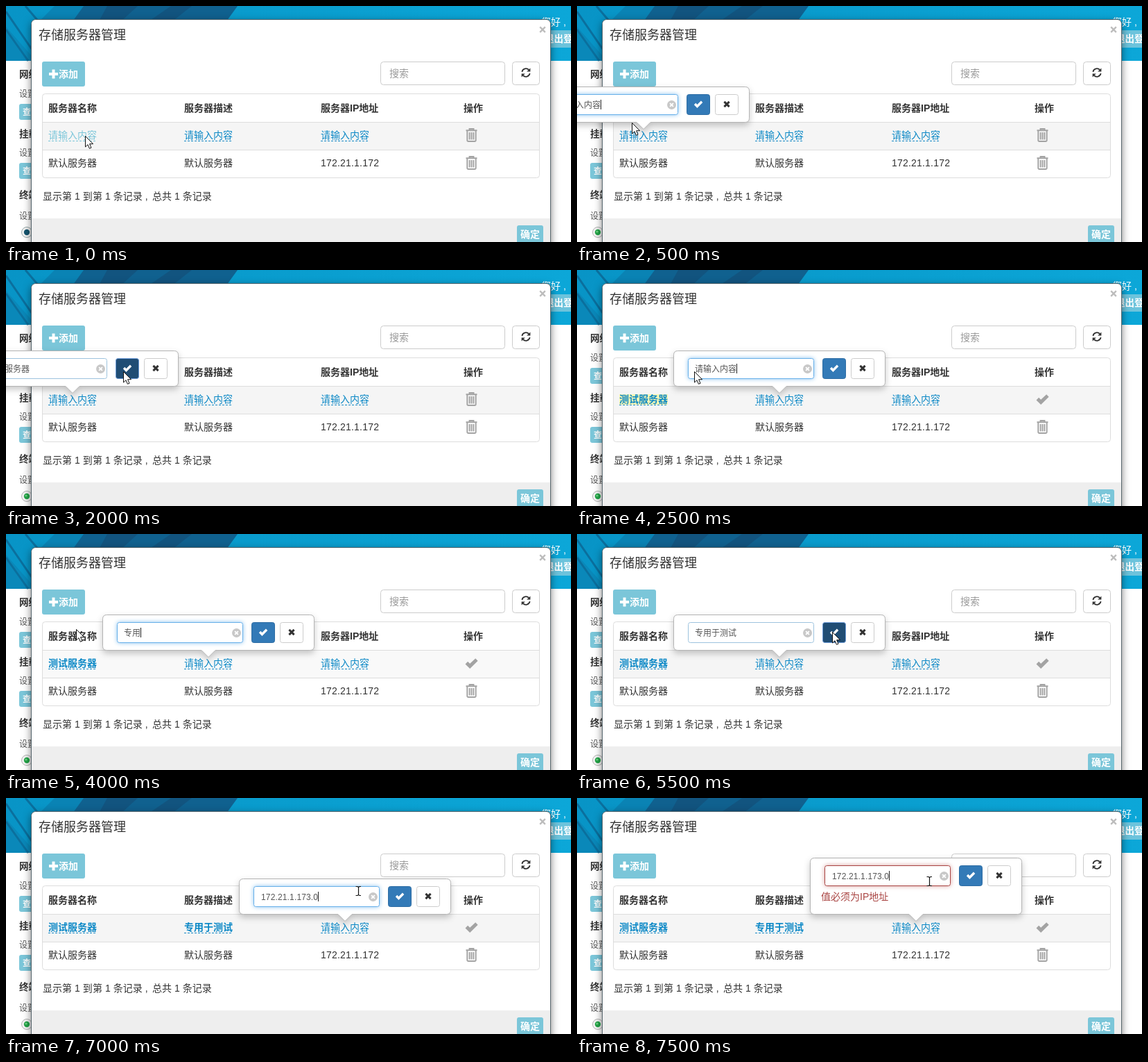
An HTML page for the animation above (8000 ms loop, 815 by 340 pixels).

```html
<!DOCTYPE html>
<html lang="zh-CN">
<head>
<meta charset="utf-8">
<title>存储服务器管理</title>
<style>
html, body { margin: 0; width: 100%; height: 100%; overflow: hidden; background: #fff; }
svg { display: block; width: 815px; height: 340px; }
text { font-family: "Liberation Sans", "Noto Sans CJK SC", "Noto Sans CJK", sans-serif; white-space: pre; }
.modal { filter: drop-shadow(0 4px 6px rgba(0,0,0,.5)); }
.pop { filter: drop-shadow(0 4px 5px rgba(0,0,0,.22)); }
.focus { filter: drop-shadow(0 0 3px rgba(102,175,233,.75)); }
.wrong { filter: drop-shadow(0 0 3px rgba(206,132,131,.8)); }
</style>
</head>
<body>
<svg id="stage" viewBox="0 0 815 340" xmlns="http://www.w3.org/2000/svg"></svg>
<script>
const STEP = 500;
const TEAL = '#7bc6d9', LINK = '#0b88c6', INK = '#333';
const COLS = [61, 257, 454];
const SAVED = ['测试服务器', '专用于测试'];
const EMPTY = '请输入内容';
const IP = '172.21.1.173.0';

// One entry per half second; pop = open editor column, arrow / beam = pointer position
const steps = [
  { arrow: [114, 187], hover: 1, hot: 1 },
  { pop: 0, text: EMPTY, caret: 1, arrow: [79, 168], hot: 1 },
  { pop: 0, text: '测试', caret: 1, hot: 1 },
  { pop: 0, text: SAVED[0], caret: 1, hot: 1 },
  { pop: 0, text: SAVED[0], press: 1, arrow: [169, 146], hot: 1 },
  { pop: 1, text: EMPTY, caret: 1, saved: 1, mark: 0, arrow: [169, 146], hot: 1 },
  { pop: 1, text: EMPTY, caret: 1, saved: 1, arrow: [112, 130] },
  { pop: 1, text: '', caret: 1, saved: 1, arrow: [112, 130] },
  { pop: 1, text: '专用', caret: 1, saved: 1, arrow: [101, 137] },
  { pop: 1, text: '专用于', caret: 1, saved: 1 },
  { pop: 1, text: SAVED[1], caret: 1, saved: 1 },
  { pop: 1, text: SAVED[1], press: 1, saved: 1, arrow: [368, 141], hot: 1 },
  { pop: 2, text: EMPTY, caret: 1, saved: 2, mark: 1, arrow: [406, 179], hot: 1 },
  { pop: 2, text: IP.slice(0, 8), caret: 1, saved: 2, arrow: [300, 132] },
  { pop: 2, text: IP, caret: 1, saved: 2, beam: [508, 134], hot: 1 },
  { pop: 2, text: IP, caret: 1, saved: 2, beam: [508, 120], hot: 1, error: 1 }
];

// Full-width comma with its mark near the middle of the cell
const comma = s => s.replace(/，(.*)/, '<tspan dx="4">,</tspan><tspan dx="6.1">$1</tspan>');
const text = (x, y, s, { size = 14, fill = INK, bold = 0, gap = 0 } = {}) =>
  `<text x="${x}" y="${y}" font-size="${size}" fill="${fill}" font-weight="${bold ? 700 : 400}" letter-spacing="${gap}">${comma(s)}</text>`;
const box = (x, y, w, h, fill, r = 0, stroke = 'none', extra = '') =>
  `<rect x="${x}" y="${y}" width="${w}" height="${h}" rx="${r}" fill="${fill}" stroke="${stroke}" ${extra}/>`;
const path = (d, fill, stroke = 'none', w = 1) =>
  `<path d="${d}" fill="${fill}" stroke="${stroke}" stroke-width="${w}"/>`;
const at = (x, y, s, scale = 1) => `<g transform="translate(${x} ${y}) scale(${scale})">${s}</g>`;

const tick = fill => path('M-6.2.3L-3.7-2.2-1.6-.1 3.9-5.4 6.3-3-1.6 4.9Z', fill);
const cross = (r, color, w) => path(`M${-r} ${-r}L${r} ${r}M${r} ${-r}L${-r} ${r}`, 'none', color, w);
const trash = y => at(671.5, y,
  path('M-3-7.5V-9H3V-7.5M-8-6.7H8M-6.2-6V7.2Q-6.2 9-4.5 9H4.5Q6.2 9 6.2 7.2V-6M-2.9-4V6.5M0-4V6.5M2.9-4V6.5', 'none', '#a3a3a3', 1.9));
const arrow = ([x, y]) => at(x, y,
  path('M.5.5V16L4 12.7 6.4 18.3 9 17.2 6.6 11.7H11.6Z', '#fff', '#111'));
const beam = ([x, y]) => at(x, y,
  path('M-3.5-6.5H-1L.5-5.5 2-6.5H4M.5-5.5V6M-3.5 6.5H-1L.5 5.5 2 6.5H4', 'none', '#111', 1.2));

function banner() {
  return box(0, 0, 815, 79, 'url(#sky)') +
    path('M0 30L37 72V79H0Z', '#0a88b9') +
    path('M0 8L37 62M0 34L32 79M28 0L62 40', 'none', '#0b6f9d', 3) +
    path('M70 0H112L96 22H48Z', '#0a83b4') +
    path('M112 0H334L318 22H96Z', '#10618f') +
    path('M146 0H190L166 22H134Z', '#12547f') +
    path('M238 0H268L240 22H206Z', '#12547f');
}

function sidebar() {
  const section = (y, title, gap) => text(19, y, title, { size: 13.5, bold: 1 }) +
    text(19, y + gap, '设置', { size: 12, fill: '#555' });
  const button = y => box(19, y, 40, 23, TEAL, 3) +
    text(24, y + 16, '查看', { size: 12, fill: '#fff', bold: 1 });
  return section(103, '网络', 28) + button(141) + section(189, '挂载', 27) + button(226) +
    section(277, '终端', 30);
}

function account() {
  return text(772, 28, '您好，', { fill: '#fff' }) +
    box(770, 35, 60, 25, '#6cc3dc', 3) +
    text(777, 52, '退出登录', { size: 13.5, fill: '#fff', bold: 1 });
}

function dialog() {
  const head = ['服务器名称', '服务器描述', '服务器IP地址', '操作'];
  const half = 'M-5.6-1.2A5.7 5.7 0 0 1 4.3-3.9';
  const tip = 'M6.4-6.6V-1.4H1.2Z';
  return `<g class="modal">${box(36.5, 19.5, 749, 340, '#fff', 6, '#56656c')}</g>` +
    box(37, 306, 748, 34, '#eee') +
    text(47, 48, '存储服务器管理', { size: 18 }) +
    at(774, 34, cross(3.8, '#bdbdbd', 2.4)) +
    box(52, 80, 62, 36, TEAL, 3) +
    path('M62 98H75M68.5 91.5V104.5', 'none', '#fff', 4) +
    text(76, 103, '添加', { fill: '#fff', bold: 1 }) +
    box(540.5, 80.5, 179, 33, '#fff', 4, '#ccc') +
    text(553, 102, '搜索', { fill: '#999' }) +
    box(730.5, 80.5, 39, 33, '#fff', 4, '#ccc') +
    at(750, 96, [0, 180].map(a => `<g transform="rotate(${a})">` +
      path(half, 'none', INK, 1.9) + path(tip, INK) + '</g>').join('')) +
    box(52.5, 126.5, 717, 121, '#fff', 4, '#ddd') +
    head.map((s, i) => text([...COLS, 660][i], 152, s, { bold: 1 })).join('') +
    path('M53 167.5H769M53 207.5H769', 'none', '#ddd') +
    text(61, 231, '默认服务器') + text(257, 231, '默认服务器') +
    text(454, 231, '172.21.1.172', { gap: .2 }) + trash(226) +
    text(53, 279, '显示第 1 到第 1 条记录，总共 1 条记录', { gap: .05 }) +
    box(737, 316, 38, 28, TEAL, 3) +
    text(742, 334, '确定', { fill: '#fff', bold: 1 });
}

function radio(first) {
  return `<circle cx="30" cy="326" r="7.5" fill="#f4f4f4" stroke="${first ? '#9aa' : '#b5b5b5'}"/>` +
    `<circle cx="30" cy="326" r="4.2" fill="${first ? '#16566f' : '#22a447'}"/>` +
    (first ? '' : '<circle cx="29" cy="325" r="1.6" fill="#6fd484"/>');
}

function editRow({ hot, hover, saved = 0, mark }) {
  const cells = COLS.map((x, i) => {
    const done = i < saved;
    const color = hover && i === 0 ? TEAL : LINK;
    return (mark === i ? box(x, 179, 70, 15, '#fbf7b4') : '') +
      text(x, 191, done ? SAVED[i] : EMPTY, { fill: color, bold: done }) +
      `<path d="M${x} 194.5h70" stroke="${color}" stroke-dasharray="3 2"/>`;
  });
  return box(53, 168, 716, 39, hot ? '#f5f5f5' : '#f9f9f9') + cells.join('') +
    (saved ? at(671.5, 187, tick('#a3a3a3'), 1.45) : trash(186));
}

function textWidth(s) {
  return [...s].reduce((w, c) => w + (c === '.' ? 3.48 : c < '\u0100' ? 6.82 : 12), 0);
}

function editor({ pop, text: value, caret, press, error }) {
  const x = [-56, 140, 337][pop], top = error ? 86 : 116, y = top + 11;
  const edge = error ? '#a94442' : caret ? '#66afe9' : '#9dc3de';
  const shape = `M${x + 5.5} ${top + .5}h293q6 0 6 6V161.5q0 6-6 6H${x + 162}l-10 10-10-10H${x + 5.5}` +
    `q-6 0-6-6V${top + 6.5}q0-6 6-6Z`;
  const shift = /^\d/.test(value) ? 1 : 0;
  const end = Math.round(x + 30 + shift + textWidth(value)) + .5;
  return `<g class="pop">${path(shape, '#fff', '#b4b4b4')}</g>` +
    box(x + 20.5, y + .5, 181, 29, '#fff', 3, edge, error ? 'class="wrong"' : caret ? 'class="focus"' : '') +
    text(x + 30 + shift, y + 19.5, value, { size: 12, fill: '#555', gap: shift * .15 }) +
    (caret ? path(`M${end} ${y + 8}v14`, 'none', '#222') : '') +
    (value ? at(x + 192.5, y + 15.5, '<circle r="6.5" fill="#c8c8c8"/>' + cross(2.4, '#fff', 2)) : '') +
    box(x + 214.5, y + .5, 33, 29, press ? '#204d74' : '#337ab7', 3, press ? '#6d9bd8' : '#2e6da4') +
    at(x + 231, y + 15, tick('#fff')) +
    box(x + 255.5, y + .5, 33, 29, '#fff', 3, '#ccc') +
    at(x + 272, y + 14.5, cross(3.6, INK, 3)) +
    (error ? text(x + 15, 147, '值必须为IP地址', { fill: '#a94442' }) : '');
}

const stage = document.getElementById('stage');
stage.innerHTML =
  `<defs><linearGradient id="sky"><stop stop-color="#0894c6"/><stop offset=".6" stop-color="#0a9fd0"/>
  <stop offset="1" stop-color="#0ca7d8"/></linearGradient></defs>` +
  banner() + sidebar() + account() + '<g id="dot"></g>' + dialog() + '<g id="live"></g>';
const dot = document.getElementById('dot');
const live = document.getElementById('live');

let shown = -1;
const start = performance.now();
function draw() {
  const i = Math.floor((performance.now() - start) / STEP) % steps.length;
  if (i !== shown) {
    const s = steps[i];
    dot.innerHTML = radio(i === 0);
    live.innerHTML = editRow(s) + ('pop' in s ? editor(s) : '') +
      (s.arrow ? arrow(s.arrow) : '') + (s.beam ? beam(s.beam) : '');
    shown = i;
  }
  requestAnimationFrame(draw);
}
draw();
</script>
</body>
</html>
```
